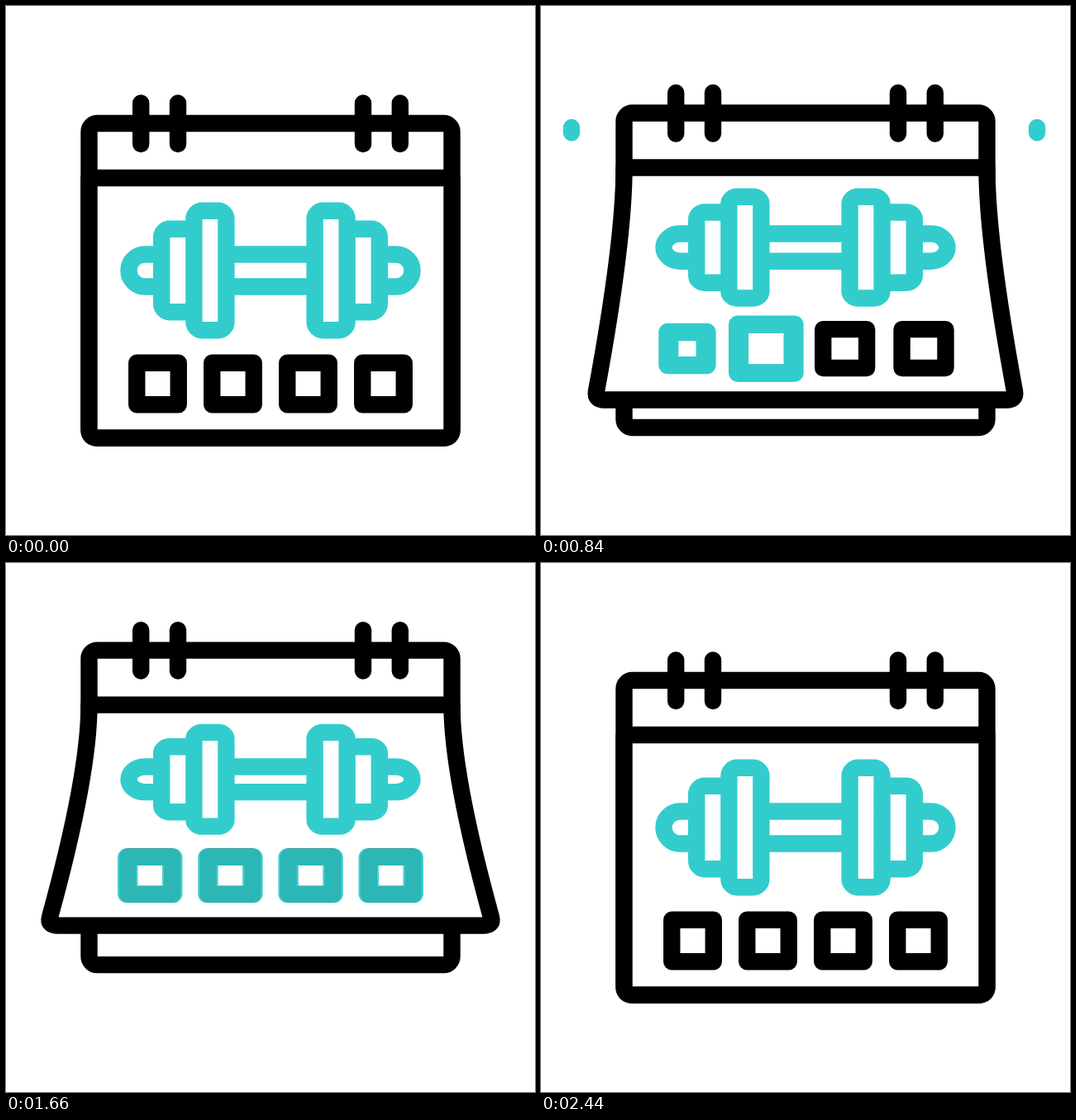
These frames come from a looping animation (640 px wide and 640 px high, 2780 ms). An HTML page with a canvas:

```html
<!DOCTYPE html>
<html lang="en">
<head>
<meta charset="utf-8">
<title>Workout calendar</title>
<style>
  html, body { margin: 0; height: 100%; overflow: hidden; background: #fff; }
  canvas { display: block; width: 640px; height: 640px; }
</style>
</head>
<body>
<canvas id="stage"></canvas>
<script>
const LOOP = 2780, TEAL = '#33cccc', LINE = 20.4;
const DIP = 45.5, PEAK = -39, REBOUND = -13, LIFT = 49;

const canvas = document.getElementById('stage');
const ctx = canvas.getContext('2d');
const dpr = window.devicePixelRatio || 1;
canvas.width = canvas.height = 640 * dpr;

const clamp = v => Math.min(1, Math.max(0, v));
const ramp = (t, a, b) => clamp((t - a) / (b - a));
const smooth = (t, a, b) => { const u = ramp(t, a, b); return u * u * (3 - 2 * u); };
const mix = (a, b, k) => a + (b - a) * k;

// cubic-bezier(x1, 0, x2, 1)
function bezier(u, x1, x2) {
  let lo = 0, hi = 1;
  for (let i = 0; i < 24; i++) {
    const s = (lo + hi) / 2, r = 1 - s;
    if (3 * r * r * s * x1 + 3 * r * s * s * x2 + s * s * s < u) lo = s; else hi = s;
  }
  return lo * lo * (3 - 2 * lo);
}

// How far the front sheet is swung open, 0..1
function openness(t) {
  return t < 1640 ? bezier(ramp(t, 420, 1640), 0.16, 0.13) : 1 - smooth(t, 1640, 1840);
}

function offsetY(t) {
  if (t < 420) return DIP * smooth(t, 220, 420);
  if (t < 1840) return mix(DIP, PEAK, openness(t));
  if (t < 2120) return mix(DIP, REBOUND, smooth(t, 1840, 2120));
  return REBOUND * (1 - smooth(t, 2120, 2440));
}

function popScale(age) {
  if (age < 140) return mix(1, 1.28, smooth(age, 0, 140));
  if (age < 400) return mix(1.28, 0.845, smooth(age, 140, 400));
  return mix(0.845, 1, smooth(age, 400, 540));
}

function stroke(color, build) {
  ctx.beginPath();
  build();
  ctx.strokeStyle = color;
  ctx.stroke();
}

function line(x1, y1, x2, y2) {
  ctx.moveTo(x1, y1);
  ctx.lineTo(x2, y2);
}

function drawBase() {
  stroke('#000', () => ctx.roundRect(100.5, 142, 439, 380.5, 10));
}

function drawFlap(p) {
  const rise = LIFT * p, top = 208, bottom = 522.5 - rise, r = 10;
  const end = bottom - r, bend = mix(top, end, 0.33);
  const half = 219.5 + rise, tip = half + r * rise / (end - bend);
  const L = v => 320 - v, R = v => 320 + v;
  ctx.beginPath();
  ctx.moveTo(L(219.5), top);
  ctx.quadraticCurveTo(L(219.5), bend, L(half), end);
  ctx.quadraticCurveTo(L(tip), bottom, L(half - r), bottom);
  ctx.lineTo(R(half - r), bottom);
  ctx.quadraticCurveTo(R(tip), bottom, R(half), end);
  ctx.quadraticCurveTo(R(219.5), bend, R(219.5), top);
  ctx.closePath();
  ctx.fillStyle = '#fff';
  ctx.fill();
  ctx.strokeStyle = '#000';
  ctx.stroke();
}

function drawPins() {
  stroke('#000', () => {
    for (const x of [163.2, 208, 432, 476.8]) line(x, 117.5, x, 167);
  });
}

// The path is squashed vertically while the line weight stays even
function drawDumbbell(p) {
  ctx.beginPath();
  ctx.save();
  ctx.translate(320, 320 - 22.5 * p);
  ctx.scale(1, 1 - 0.22 * p);
  for (const y of [-19.5, 19.5]) line(-53.6, y, 53.6, y);
  for (const side of [-1, 1]) {
    ctx.save();
    ctx.scale(side, 1);
    ctx.roundRect(53.6, -72.3, 39, 144.6, 10);
    ctx.moveTo(92.6, -50.2);
    ctx.arcTo(131.8, -50.2, 131.8, 0, 10);
    ctx.arcTo(131.8, 50.2, 92.6, 50.2, 10);
    ctx.lineTo(92.6, 50.2);
    ctx.moveTo(131.8, -19.5);
    ctx.lineTo(152, -19.5);
    ctx.arc(152, 0, 19.5, -Math.PI / 2, Math.PI / 2);
    ctx.lineTo(131.8, 19.5);
    ctx.restore();
  }
  ctx.restore();
  ctx.strokeStyle = TEAL;
  ctx.stroke();
}

function drawDays(t, p) {
  const sx = 1 + 0.07 * p, sy = 1 - 0.105 * p, y = 457 - 43.7 * p;
  for (let i = 0; i < 4; i++) {
    const age = t - 465 - i * 200, pop = popScale(age);
    const x = 320 + (i - 1.5) * 91 * sx;
    const w = 50.5 * sx * pop, h = 50.5 * sy * pop;
    stroke('#000', () => ctx.rect(x - w / 2, y - h / 2, w, h));

    const tint = ramp(age, 0, 140) * (1 - ramp(t, 1640, 1840));
    if (!tint) continue;
    const bx = 23 * sx, by = 23 * sy;
    ctx.globalAlpha = tint;
    ctx.fillStyle = TEAL;
    ctx.beginPath();
    ctx.roundRect(x - (w + bx) / 2, y - (h + by) / 2, w + bx, h + by, 11);
    ctx.rect(x - (w - bx) / 2, y - (h - by) / 2, w - bx, h - by);
    ctx.fill('evenodd');
    ctx.globalAlpha = 1;
  }
}

function drawStreaks(t) {
  const head = smooth(t, 420, 785), tail = smooth(t, 505, 870);
  if (head <= tail) return;
  const y = k => mix(495, 147, k);
  for (const x of [38.2, 601.4]) {
    stroke(TEAL, () => line(x - 1.3 * tail, y(tail), x - 1.3 * head, y(head)));
  }
}

function draw(t) {
  const p = openness(t);
  ctx.setTransform(dpr, 0, 0, dpr, 0, 0);
  ctx.fillStyle = '#fff';
  ctx.fillRect(0, 0, 640, 640);
  ctx.lineWidth = LINE;
  ctx.lineCap = ctx.lineJoin = 'round';
  drawStreaks(t);
  ctx.translate(0, offsetY(t));
  drawBase();
  drawFlap(p);
  drawPins();
  drawDumbbell(p);
  drawDays(t, p);
}

const start = performance.now();
function tick() {
  draw((performance.now() - start) % LOOP);
  requestAnimationFrame(tick);
}
tick();
</script>
</body>
</html>
```
